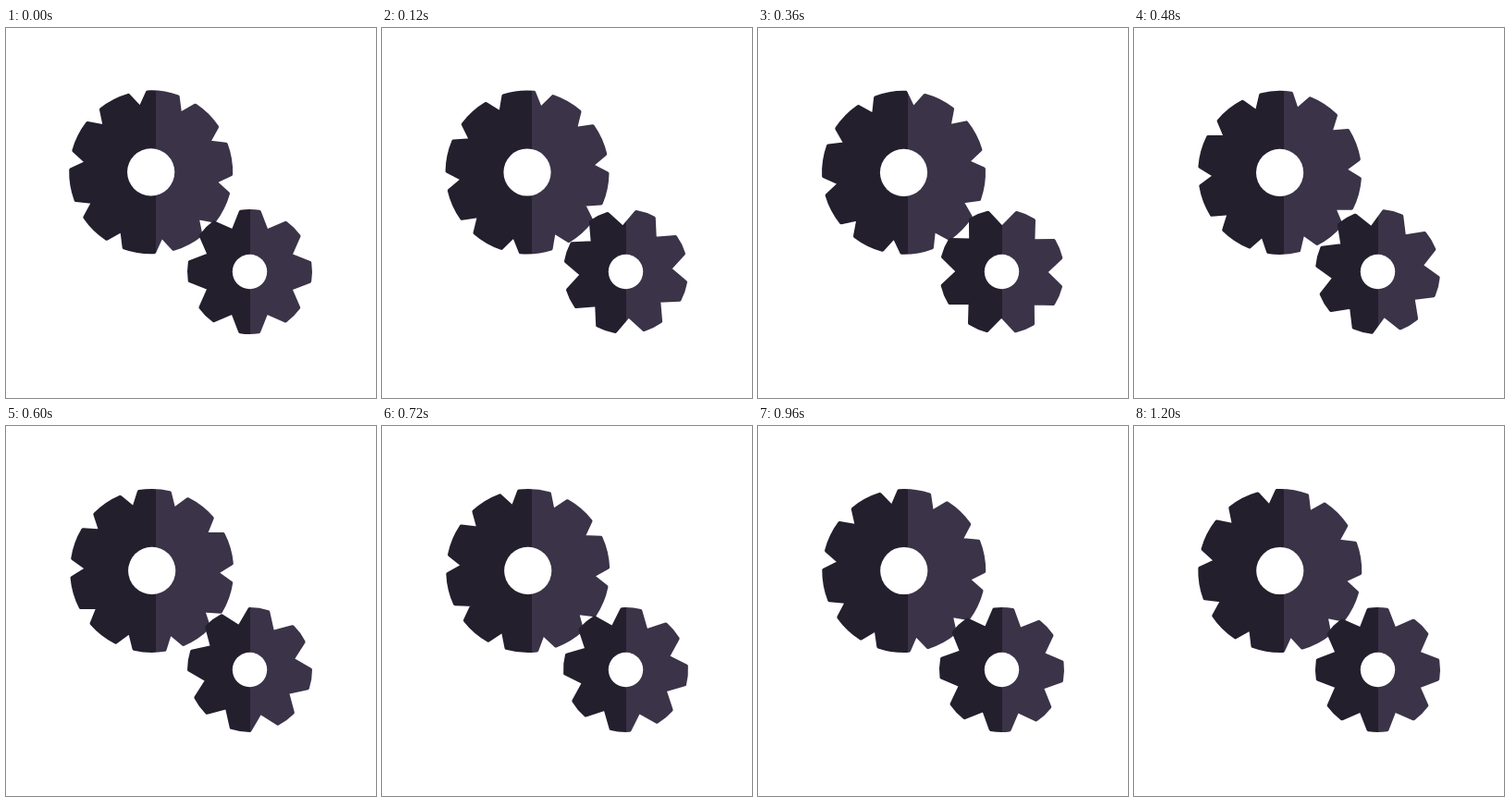
An HTML page with a canvas for the animation above (2.26 s loop, 400x400 px).

```html
<!DOCTYPE html>
<html lang="en">
<head>
<meta charset="utf-8">
<title>Gears</title>
<style>
  html, body { margin: 0; height: 100%; overflow: hidden; background: #fff; }
  canvas { display: block; }
</style>
</head>
<body>
<canvas id="stage" width="400" height="400"></canvas>
<script>
const ctx = document.getElementById('stage').getContext('2d');
const LOOP = 2260, STEP = 30, KEY = 120;
const DARK = '#231f2d', LIGHT = '#3b3348';
const RAD = Math.PI / 180;

// Degrees the large gear still has to turn, one key every 120 ms
const LEFT = [72.2, 51, 29.7, 18.4, 11.5, 7, 4.2, 2.4, 1.3, 0.5, 0];

function remaining(t) {
  const last = LEFT.length - 1;
  const i = Math.floor(t / KEY);
  if (i >= last) return 0;
  const u = t / KEY - i;
  const b = LEFT[i], c = LEFT[i + 1];
  const a = i ? LEFT[i - 1] : 2 * b - c;
  const d = i + 2 > last ? 0 : LEFT[i + 2];
  return b + u * (c - a + u * (2 * a - 5 * b + 4 * c - d + u * (3 * (b - c) + d - a))) / 2;
}

// Clockwise from straight up
const toRad = deg => (deg - 90) * RAD;

function gear({ x, y, teeth, tip, root, half, hole, split, turn }) {
  const pitch = 360 / teeth;
  const paint = ctx.createLinearGradient(0, 0, 400, 0);
  paint.addColorStop(split / 400, DARK);
  paint.addColorStop(split / 400, LIGHT);
  ctx.fillStyle = ctx.strokeStyle = paint;
  ctx.lineWidth = 4;
  ctx.lineJoin = 'round';
  ctx.beginPath();
  for (let i = 0; i < teeth; i++) {
    const mid = turn + i * pitch;
    const notch = toRad(mid + pitch / 2);
    ctx.arc(x, y, tip, toRad(mid - half), toRad(mid + half));
    ctx.lineTo(x + root * Math.cos(notch), y + root * Math.sin(notch));
  }
  ctx.closePath();
  ctx.fill();
  ctx.stroke();
  ctx.fillStyle = '#fff';
  ctx.beginPath();
  ctx.arc(x, y, hole, 0, 2 * Math.PI);
  ctx.fill();
}

function draw(t) {
  const left = remaining(t);
  const drift = left / 72;
  ctx.clearRect(0, 0, 400, 400);
  gear({
    x: 157.8 - 1.1 * drift, y: 156.5 - 0.7 * drift,
    teeth: 10, tip: 86.5, root: 70.1, half: 11, hole: 25.6,
    split: 162, turn: 8.8 - left
  });
  gear({
    x: 263.5, y: 263.5,
    teeth: 8, tip: 65.5, root: 47.5, half: 8.8, hole: 18.7,
    split: 264, turn: left * 1.25
  });
}

let start;
function frame(now) {
  start ??= now;
  const t = (now - start) % LOOP;
  draw(Math.floor(t / STEP) * STEP);
  requestAnimationFrame(frame);
}
draw(0);
requestAnimationFrame(frame);
</script>
</body>
</html>
```
